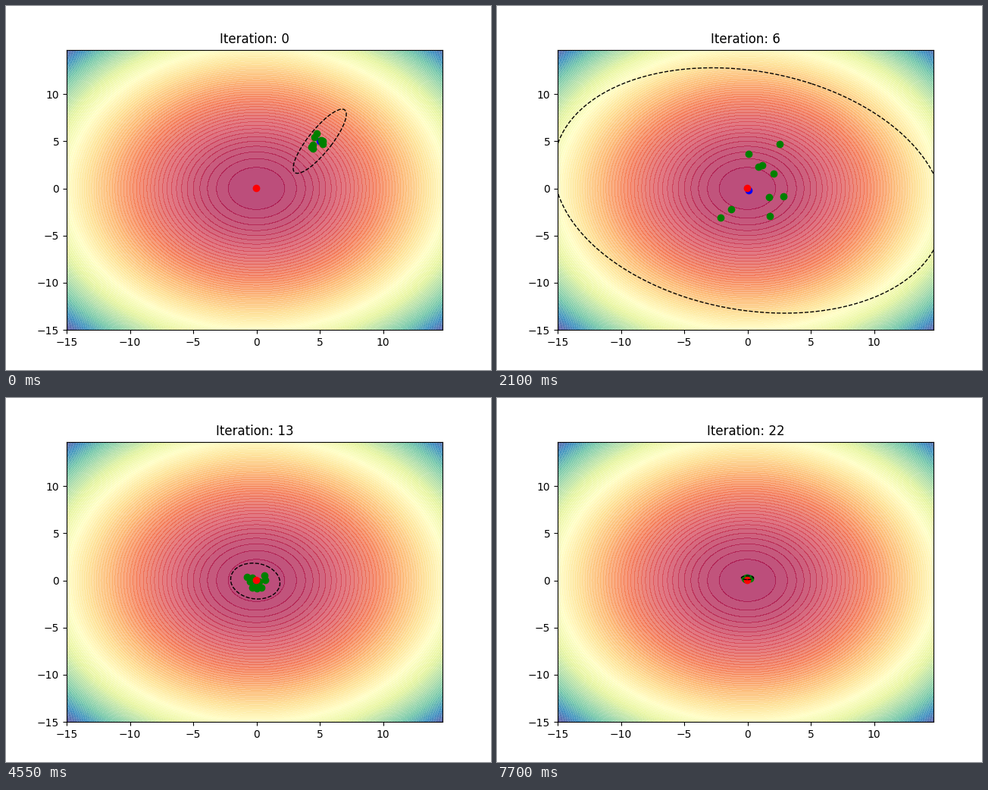
These frames come from a looping animation (640 px wide and 480 px high, 8 s). A matplotlib script:

```python
import numpy as np
import matplotlib.pyplot as plt
from matplotlib.animation import FuncAnimation
from matplotlib.patches import Ellipse

HOLD = 7          # ticks of 50 ms per iteration
TICKS = 160
POP = 10
SPREAD = .28      # standard deviation relative to the ring

# iteration, mean x, mean y, half width, half height, correlation
KEYS = np.array([
    (-1, 5.00, 5.00, 2.10, 2.10, 0),
    (0, 5.00, 5.00, 2.10, 3.40, .84),
    (4, 3.46, .70, 9.12, 7.05, -.11),
    (6, .09, -.22, 15.4, 13.0, -.185),
    (7, .70, 0, 5.65, 6.65, -.25),
    (9, -.15, -.10, 2.38, 3.76, -.48),
    (13, -.09, -.07, 1.95, 1.90, -.10),
    (17, 0, .17, 1.14, 1.14, .38),
    (22, 0, .28, .48, .20, 0),
])


def distribution(i):
    """Mean and covariance; sizes grow and shrink geometrically between keys."""
    at = KEYS[:, 0]
    x, y, rho = (np.interp(i, at, KEYS[:, k]) for k in (1, 2, 5))
    w, h = (np.exp(np.interp(i, at, np.log(KEYS[:, k]))) for k in (3, 4))
    return np.array([x, y]), np.array([[w * w, rho * w * h], [rho * w * h, h * h]])


def population(i):
    # each population is sampled before the distribution is updated
    center, cov = distribution(i - 1)
    rng = np.random.default_rng(40 + i)
    z = np.clip(rng.standard_normal((POP, 2)), -1.8, 1.8)
    return center + SPREAD * z @ np.linalg.cholesky(cov).T


fig, ax = plt.subplots(figsize=(6.4, 4.8), dpi=100)
axis = np.arange(-15, 15, .3)
X, Y = np.meshgrid(axis, axis)
ax.contourf(X, Y, X**2 + Y**2, levels=np.arange(0, 451, 5), cmap="Spectral", alpha=.7)
ax.set_xlim(axis[0], axis[-1])
ax.set_ylim(axis[0], axis[-1])
ax.set_autoscale_on(False)

mean = ax.scatter([5], [5], c="blue")
swarm = ax.scatter([5], [5], c="green")
ax.scatter([-.02], [.02], c="red")
ring = ax.add_patch(Ellipse((5, 5), 1, 1, fill=False, ls="--", lw=1, ec="black"))
title = ax.set_title("Iteration: 0")


def update(tick):
    i = tick // HOLD
    center, cov = distribution(i)
    vals, vecs = np.linalg.eigh(cov)
    minor, major = 2 * np.sqrt(vals)
    ring.set_center(center)
    ring.set_width(major)
    ring.set_height(minor)
    ring.set_angle(np.degrees(np.arctan2(vecs[1, 1], vecs[0, 1])))
    mean.set_offsets([center])
    swarm.set_offsets(population(i))
    title.set_text(f"Iteration: {i}")
    return mean, swarm, ring, title


anim = FuncAnimation(fig, update, frames=TICKS, interval=50, repeat=True, repeat_delay=0)
plt.show()
```
